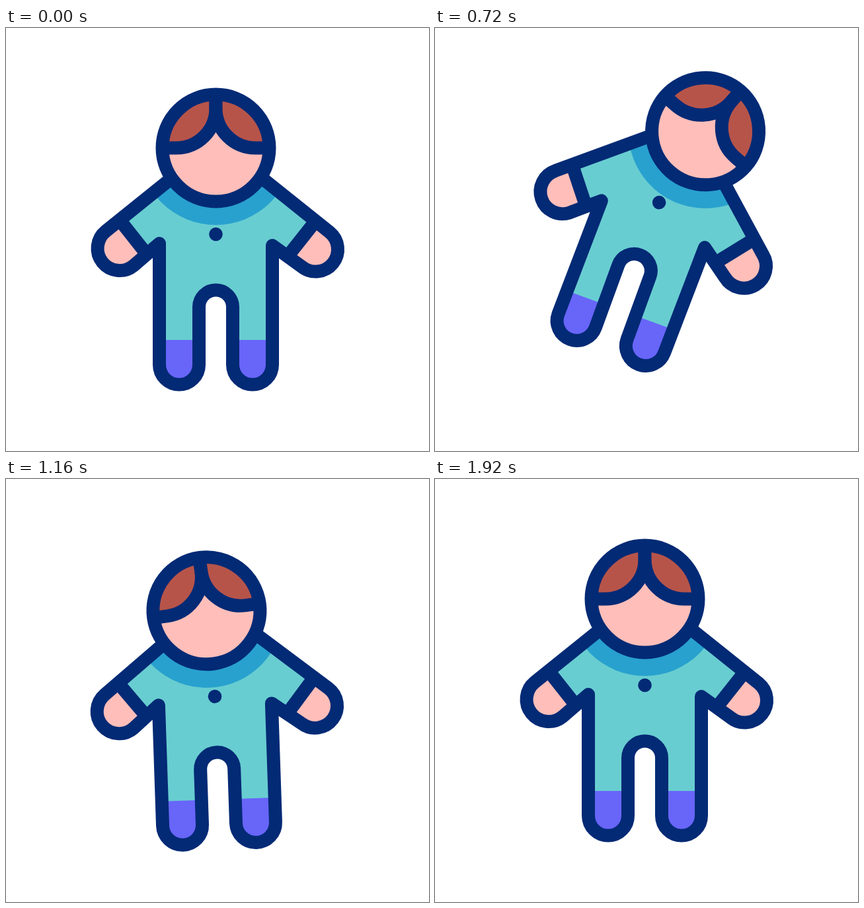
Animation, 640 px wide and 640 px high, one loop 2000 ms. Source, as an HTML page with a canvas:

```html
<!DOCTYPE html>
<html>
<head>
<meta charset="utf-8">
<style>
html, body { margin: 0; height: 100%; overflow: hidden; background: #fff; }
canvas { display: block; width: 100vmin; height: 100vmin; }
</style>
</head>
<body>
<canvas id="c" width="640" height="640"></canvas>
<script>
const g = document.getElementById('c').getContext('2d');
const NAVY = '#032a75', TEAL = '#68cdd1', COLLAR = '#28a1ce',
      SOCK = '#6865f9', HAIR = '#b7544a', SKIN = '#ffbeb9';
const PI = Math.PI, DEG = PI / 180;

// Turning points of each motion as [time, value]
const motion = {
  tilt: [[200, 0], [660, 20.4], [700, 20.4], [975, -3.2], [1420, 0.2], [1880, 0]],
  nod:  [[240, 0], [720, 21], [1060, -7.2], [1440, 1.2], [1880, 0]],
  hop:  [[200, 0], [720, -38.5], [740, -38.5], [1340, 25.5], [1820, 0]],
  grow: [[220, 0], [770, 13.6], [1420, -14], [1880, 0]]
};

// Sine ease from one turning point to the next
function ease(keys, t) {
  const i = keys.findIndex(k => k[0] > t);
  if (i < 1) return 0;
  const [t0, a] = keys[i - 1], [t1, b] = keys[i];
  return a + (b - a) * (1 - Math.cos(PI * (t - t0) / (t1 - t0))) / 2;
}

function circle(r) {
  g.beginPath();
  g.arc(0, 0, r, 0, 2 * PI);
}

function disc(r, color) {
  circle(r);
  g.fillStyle = color;
  g.fill();
}

// Body outline; the origin lies midway between the feet
function bodyPath(grow, pull, arms) {
  const b = new Path2D(), [l, r] = arms;
  const neck = -299.5 - 0.2 * grow;
  b.moveTo(-45.5, neck);
  b.arc(l.x, l.y, 33.5, 231.2 * DEG, 51.2 * DEG, true);
  b.lineTo(l.x + 60, l.y - 7.5);
  b.arc(-55.5, 0, 30, PI, 0, true);
  b.arc(0, -87.5 - grow, 25.5, PI, 2 * PI);
  b.arc(55.5, 0, 30, PI, 0, true);
  b.lineTo(r.x - 65.5, r.y - 6);
  b.arc(r.x, r.y, 33.5, 128.8 * DEG, -51.2 * DEG, true);
  b.lineTo(48.5, neck);
  return b;
}

function head() {
  disc(81, SKIN);
  for (const side of [-1, 1]) {
    g.save();
    g.scale(side, 1);
    const lock = new Path2D('M0-81V-60A60 60 0 0 0 60 0H81');
    const patch = new Path2D(lock);
    patch.arc(0, 0, 81, 0, -PI / 2, true);
    g.fillStyle = HAIR;
    g.fill(patch);
    g.stroke(lock);
    g.restore();
  }
  circle(81);
  g.stroke();
}

function toHead(nod, grow) {
  g.translate(0, -247.5 - grow);
  g.rotate(nod * DEG);
  g.translate(0, -80.5);
}

function draw(t) {
  const { tilt, nod, hop, grow } =
    Object.fromEntries(Object.entries(motion).map(([k, keys]) => [k, ease(keys, t)]));
  // Stretching pulls the right arm down, squashing lowers both
  const pull = Math.max(0, grow), squash = Math.max(0, -grow);
  const arms = [
    { x: -145.5 + 0.2 * pull, y: -176 + 0.18 * squash, side: 1 },
    { x: 151 + 0.2 * pull, y: -174.5 + 0.18 * squash + 0.75 * pull, side: -1 }
  ];

  g.fillStyle = '#fff';
  g.fillRect(0, 0, 640, 640);
  g.save();
  g.translate(317.5, 361.5 + hop);
  g.rotate(tilt * DEG);
  g.translate(0, 148);
  g.lineWidth = 20;
  g.lineJoin = 'round';
  g.strokeStyle = NAVY;

  const body = bodyPath(grow, pull, arms);
  g.save();
  g.clip(body);
  g.fillStyle = TEAL;
  g.fillRect(-250, -350, 500, 400);
  g.fillStyle = SOCK;
  g.fillRect(-100, -37.5 + 0.1 * squash, 200, 90);
  g.fillStyle = SKIN;
  for (const { x, y, side } of arms) {
    g.beginPath();
    for (const [dx, dy] of [[0, -43], [40, 7.5], [0, 60], [-60, 60], [-60, -43]])
      g.lineTo(x + side * dx, y + dy);
    g.fill();
  }
  toHead(nod, grow);
  disc(116.5, COLLAR);
  g.restore();

  g.stroke(body);
  for (const { x, y, side } of arms) {
    g.beginPath();
    g.moveTo(x, y - 43);
    g.lineTo(x + side * 40, y + 7.5);
    g.stroke();
  }
  g.save();
  g.translate(0, -197.5 - grow);
  disc(10.3, NAVY);
  g.restore();
  toHead(nod, grow);
  head();
  g.restore();
}

function tick() {
  draw(performance.now() % 2000);
  requestAnimationFrame(tick);
}
tick();
</script>
</body>
</html>
```
